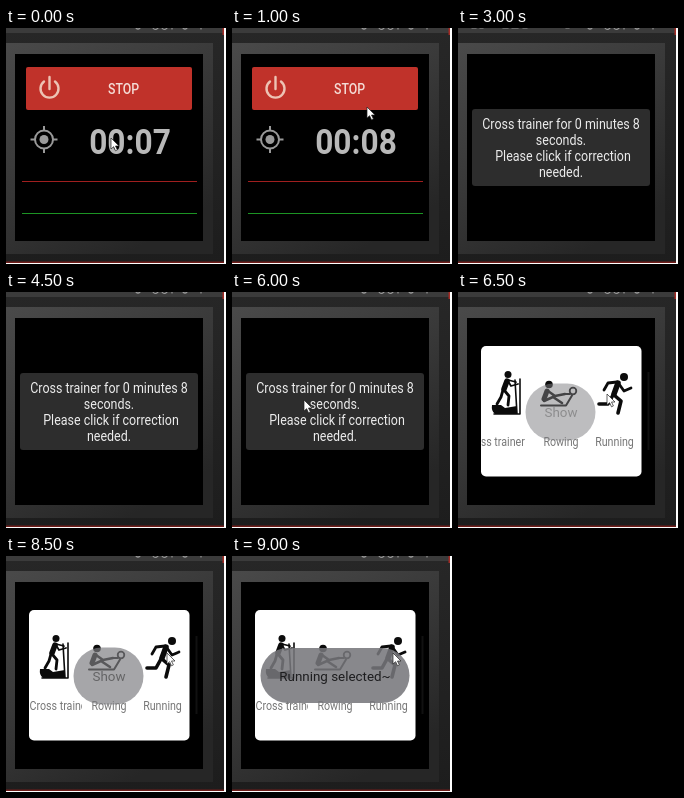
An HTML page for the animation above (9.5 s loop, 220x236 px).

```html
<!DOCTYPE html>
<html lang="en">
<head>
<meta charset="utf-8">
<title>Workout timer</title>
<style>
html, body { margin: 0; width: 100%; height: 100%; overflow: hidden; background: #fff; }
svg { display: block; width: 220px; height: 236px; }
text { font-family: Roboto, "Open Sans", sans-serif; text-anchor: middle; }
.line { fill: none; stroke-linecap: round; stroke-linejoin: round; }
.label { font-size: 12px; fill: #777; }
.start { text-anchor: start; }
</style>
</head>
<body>
<svg viewBox="0 0 220 236">
  <defs>
    <linearGradient id="bezel" x2=".6" y2="1">
      <stop stop-color="#4a4a4a"/><stop offset=".5" stop-color="#393939"/><stop offset="1" stop-color="#262626"/>
    </linearGradient>
    <linearGradient id="wall" x2="0" y2="1">
      <stop stop-color="#272727"/><stop offset="1" stop-color="#1d1d1d"/>
    </linearGradient>
    <clipPath id="labelClip"><rect x="23.5" y="140" width="52.5" height="18"/></clipPath>
  </defs>

  <rect width="218" height="235" fill="url(#wall)"/>
  <rect width="218" height="5" fill="#3b3b3b"/>
  <g id="strip" class="line" stroke="#999" stroke-width="1.2">
    <path d="M130 0q2 2 4 0M147 0q2 3 5 0M156 0q2 3 5 0M166 0v1M177 0q2 2 4 0M195 0v1"/>
    <path id="stripText" d="M14 0h4M22 0h3M45 0h5M54 0h6M65 0h4M108 0h3"/>
  </g>
  <rect x="216.500" width="1.500" height="7" fill="#a32a24"/>
  <rect y="233.500" width="218" height="1.500" fill="#701d1a"/>
  <rect x="-4" y="15" width="211" height="211" fill="url(#bezel)"/>
  <rect x="9" y="26" width="188" height="187" fill="#000"/>

  <g id="timer">
    <rect x="20" y="39" width="166" height="43" rx="2" fill="#c0322a"/>
    <path class="line" d="M38 53.500a9 9 0 1 0 11 0M43.500 49v12" stroke="#edc3b4" stroke-width="2.400"/>
    <text transform="translate(117.5 65.5) scale(.88 1)" font-size="14" font-weight="500" fill="#f4dcd6">STOP</text>
    <g stroke="#999" fill="none" stroke-width="2">
      <circle cx="38" cy="111.500" r="9"/>
      <path d="M38 98v5m0 17v5M24.500 111.500h5m17 0h5"/>
      <circle cx="38" cy="111.500" r="4.500" fill="#999" stroke="none"/>
    </g>
    <text id="clock" transform="translate(124 126) scale(.88 1)" font-size="36" font-weight="700" fill="#b9b9b9"></text>
    <path d="M16 153.500H191" stroke="#a01f1f"/>
    <path d="M16 185.500H191" stroke="#1c9424"/>
  </g>

  <g id="message">
    <rect x="14" y="81" width="178" height="77" rx="3" fill="#2d2d2d"/>
    <g id="messageText" fill="#ececec" font-size="14"></g>
  </g>

  <g id="picker">
    <path d="M190.500 80v78" stroke="#111" stroke-width="2"/>
    <rect x="23" y="54" width="160.500" height="130.500" rx="5" fill="#fff"/>
    <g class="line" stroke="#0b0b0b">
      <g fill="#0b0b0b" stroke="none">
        <circle cx="50" cy="82.500" r="3.500"/>
        <path d="M34 113h9l4 3 12-2v8H37q-4-3-3-9z"/>
        <circle cx="91" cy="92.500" r="3.800"/>
        <circle cx="166" cy="85" r="4"/>
      </g>
      <path d="M49 89l-3 8" stroke-width="5.500"/>
      <path d="M46 98l5 6-1 9M45 98l-2 7-4 7" stroke-width="2.800"/>
      <path d="M50 89l3 5 7-2M50 88l8 2" stroke-width="1.800"/>
      <path d="M57 88l2 34M62 87v35M36 122h26" stroke-width="1.600"/>
      <path d="M89 99l-3 8" stroke-width="5"/>
      <path d="M86 109l9-4 9 6M90 99l7 5 10-2" stroke-width="2.600"/>
      <path d="M83 113.500h25l6-10M107 102h5" stroke-width="2"/>
      <circle cx="115" cy="99" r="3.300" stroke-width="1.800"/>
      <path d="M160 91l-4 11" stroke-width="5.500"/>
      <path d="M159 90l-9 1-4 7M161 92l5 7 7-3" stroke-width="2.800"/>
      <path d="M156 103l7 6-3 12M155 103l-5 9h-9" stroke-width="3.600"/>
    </g>
    <g clip-path="url(#labelClip)">
      <g id="marquee" class="label">
        <text class="start" transform="translate(23.5 153.5) scale(.89 1)">Cross trainer</text>
        <text class="start" transform="translate(103.5 153.5) scale(.89 1)">Cross trainer</text>
      </g>
    </g>
    <text class="label" transform="translate(103 153.5) scale(.89 1)">Rowing</text>
    <text class="label" transform="translate(156.5 153.5) scale(.89 1)">Running</text>
    <g id="show">
      <rect x="67.500" y="91.500" width="70" height="57" rx="28.500" fill="#7d7d81"/>
      <text x="103" y="124.500" font-size="13.400" fill="#1d1d1f">Show</text>
    </g>
    <g id="selected">
      <rect x="28.500" y="92" width="149" height="55" rx="27.500" fill="#77777b" opacity=".87"/>
      <text x="103" y="124.500" font-size="13.400" fill="#1d1d1f">Running selected~</text>
    </g>
  </g>

  <path id="cursor" d="M0 0v11l2.600-2.300 1.900 4.100 1.900-.9-1.900-3.900H8z" fill="#fff" stroke="#222" stroke-width=".7"/>
</svg>
<script>
const LOOP = 9500, STEP = 500;
const $ = id => document.getElementById(id);
const show = (id, on) => $(id).setAttribute("display", on ? "inline" : "none");
const move = (id, x, y) => $(id).setAttribute("transform", `translate(${x} ${y})`);

// Lines of the notice share one condensed lettering ratio.
const notice = ["Cross trainer for 0 minutes 8", "seconds.", "Please click if correction", "needed."];
notice.forEach((line, i) => {
  const text = document.createElementNS("http://www.w3.org/2000/svg", "text");
  text.setAttribute("transform", `translate(${i === 2 ? 105 : 103} ${101 + i * 16}) scale(.89 1)`);
  text.textContent = line;
  $("messageText").append(text);
});

// Pointer stops: start time, x, y; a stop without a position hides it.
const pointer = [
  [0, 105, 110], [500, 107, 112], [1000, 135, 79], [2500, 134, 80], [3000],
  [5500, 68, 100], [6000, 72, 108], [6500, 149, 102], [7500, 161, 97]
];

function draw(now) {
  const t = Math.floor(now % LOOP / STEP) * STEP;
  const picking = t >= 6500;

  show("timer", t < 1500);
  $("clock").textContent = t < 1000 ? "00:07" : "00:08";
  show("message", t >= 1500 && !picking);
  move("message", 0, t === 1500 ? 7.5 : 0);
  show("stripText", t >= 1500 && t < 4500);

  show("picker", picking);
  move("marquee", -Math.min(80, 33 + (t - 7000) * 47 / 1500), 0);
  show("show", t < 9000);
  $("show").setAttribute("opacity", t < 7000 ? 0.5 : t < 8500 ? 0.9 : 0.68);
  show("selected", t >= 9000);

  const [, x, y] = pointer.filter(stop => stop[0] <= t).pop();
  show("cursor", x !== undefined);
  if (x !== undefined) move("cursor", x, y);
}

const begin = performance.now();
function tick() {
  draw(performance.now() - begin);
  requestAnimationFrame(tick);
}
tick();
</script>
</body>
</html>
```
